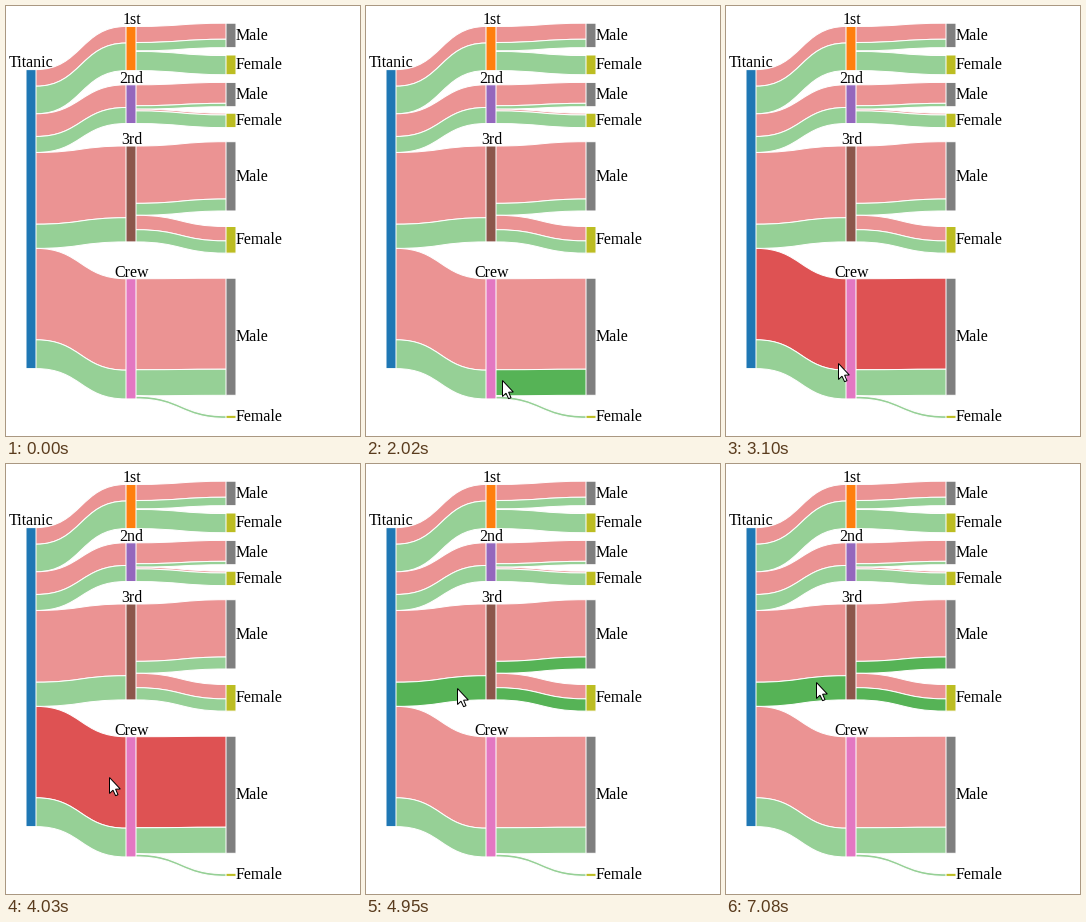
Animation of 354x430 px, one loop 8 s. Source, as a matplotlib script:

```python
import numpy as np
import matplotlib.pyplot as plt
from matplotlib.animation import FuncAnimation
from matplotlib.patches import PathPatch, Polygon, Rectangle
from matplotlib.path import Path

W, H, DPI = 354, 430, 100
INTERVAL, LOOP = 20, 8000
PX = 72 / DPI
NODE_W, COLUMN_STEP, LEFT = 10, 100, 20
SCALE = 0.13585  # pixels per person
FATES = {"dead": (214, 39, 40), "alive": (44, 160, 44)}
SEXES = {"male": "#7f7f7f", "female": "#bcbd22"}

# class: color, then for each sex its top edge and (dead, alive) counts
CLASSES = {
    "1st": ("#ff7f0e", (17.2, (118, 62)), (49.0, (4, 141))),
    "2nd": ("#9467bd", (76.4, (154, 25)), (107.2, (13, 93))),
    "3rd": ("#8c564b", (135.7, (422, 88)), (220.5, (106, 90))),
    "Crew": ("#e377c2", (272.2, (670, 192)), (409.3, (3, 20))),
}

# Pointer moves: start and end time, where it comes to rest
ENTRY = (251, 425)
MOVES = [
    (510, 1240, (190.5, 384)), (1720, 2390, (118, 371)),
    (2940, 3400, (109, 350)), (3950, 4720, (92, 237)),
    (4800, 4950, (91, 224)), (5910, 6290, (91, 198)),
    (6620, 6840, (89, 217)), (7010, 7080, (90, 218)),
]
STEP = 75      # ms between pointer positions
HIT_INSET = 2.5  # how far inside a link the tip must be
ARROW = np.array([(0.5, 0.5), (0.5, 16.5), (4, 13.2), (6.6, 18.7), (9, 17.7),
                  (6.6, 12.2), (11.3, 12.0)])

fig = plt.figure(figsize=(W / DPI, H / DPI), dpi=DPI, facecolor="white")
ax = fig.add_axes([0, 0, 1, 1])
ax.set(xlim=(0, W), ylim=(H, 0))
ax.axis("off")
links = {}


def tint(fate, opacity):
    return tuple(1 - opacity * (1 - c / 255) for c in FATES[fate])


def column_x(column):
    return LEFT + column * COLUMN_STEP


def add_link(key, column, y0, y1, people):
    """Ribbon between two columns; its ends are tucked under the nodes."""
    x0, x1 = column_x(column) + NODE_W, column_x(column + 1)
    mid, h, tuck = (x0 + x1) / 2, people * SCALE, 2
    points = [(x0 - tuck, y0), (x0, y0), (mid, y0), (mid, y1), (x1, y1), (x1 + tuck, y1),
              (x1 + tuck, y1 + h), (x1, y1 + h), (mid, y1 + h), (mid, y0 + h),
              (x0, y0 + h), (x0 - tuck, y0 + h), (x0 - tuck, y0)]
    edge = [Path.LINETO] + [Path.CURVE4] * 3 + [Path.LINETO]
    codes = [Path.MOVETO] + edge + [Path.LINETO] + edge + [Path.CLOSEPOLY]
    links[key] = ax.add_patch(PathPatch(Path(points, codes), fc=tint(key[1], 0.5),
                                        ec="white", lw=PX, zorder=1))


def add_node(column, top, people, color, label):
    x, h = column_x(column), people * SCALE
    ax.add_patch(Rectangle((x, top), NODE_W, h, fc=color, ec="white", lw=PX,
                           snap=False, zorder=2))
    if column == 2:
        place, align = (x + NODE_W, top + h / 2 + 4.3), "left"
    else:
        place, align = (x + NODE_W / 2 + 0.5, top - 2.2), "center"
    ax.text(*place, label, ha=align, va="baseline", family="Liberation Serif",
            size=16 * PX, zorder=3)


def balanced_top(children):
    """Top edge and size of a node centred on the weighted mean of its children."""
    tops, sizes = np.array(children).T
    total = sizes.sum()
    center = np.average(tops + sizes * SCALE / 2, weights=sizes)
    return center - total * SCALE / 2, total


def build_chart():
    nodes = {name: balanced_top([(top, sum(counts)) for top, counts in groups])
             for name, (_, *groups) in CLASSES.items()}
    root_top, everyone = balanced_top(list(nodes.values()))
    root_y = root_top
    for name, (color, *groups) in CLASSES.items():
        top, total = nodes[name]
        y = top
        for fate, people in zip(FATES, np.sum([counts for _, counts in groups], axis=0)):
            add_link((name, fate, "total"), 0, root_y, y, people)
            root_y += people * SCALE
            y += people * SCALE
        y = top
        for sex, (sex_y, counts) in zip(SEXES, groups):
            add_node(2, sex_y, sum(counts), SEXES[sex], sex.title())
            for fate, people in zip(FATES, counts):
                add_link((name, fate, sex), 1, y, sex_y, people)
                y += people * SCALE
                sex_y += people * SCALE
        add_node(1, top, total, color, name)
    add_node(0, root_top, everyone, "#1f77b4", "Titanic")


def pointer_tip(t):
    """Tip position: each move slows down and advances in discrete steps."""
    tip = np.array(ENTRY, float)
    for start, end, rest in MOVES:
        if t < start:
            break
        steps = round((end - start) / STEP) + 1
        done = min(int((t - start) / (end - start) * (steps - 1) + 0.1) + 1, steps)
        tip += (np.array(rest) - tip) * (1 - (1 - done / steps) ** 2)
    return tip


def link_under(tip):
    for key, patch in links.items():
        if all(patch.get_path().contains_point(tip + (0, dy)) for dy in (-HIT_INSET, HIT_INSET)):
            return key
    return None


def update(frame):
    t = (frame + 0.5) * INTERVAL
    visible = t >= MOVES[0][0]
    tip = pointer_tip(t)
    hover = link_under(tip) if visible else None
    for key, patch in links.items():
        lit = hover and key[:2] == hover[:2] and hover[2] in ("total", key[2])
        patch.set_facecolor(tint(key[1], 0.8 if lit else 0.5))
    pointer.set_visible(visible)
    pointer.set_xy(ARROW + np.round(tip))
    return [*links.values(), pointer]


build_chart()
pointer = ax.add_patch(Polygon(ARROW, fc="white", ec="black", lw=PX,
                               joinstyle="miter", zorder=4, visible=False))
anim = FuncAnimation(fig, update, frames=LOOP // INTERVAL, interval=INTERVAL,
                     repeat=True, repeat_delay=0, blit=False)
plt.show()
```
